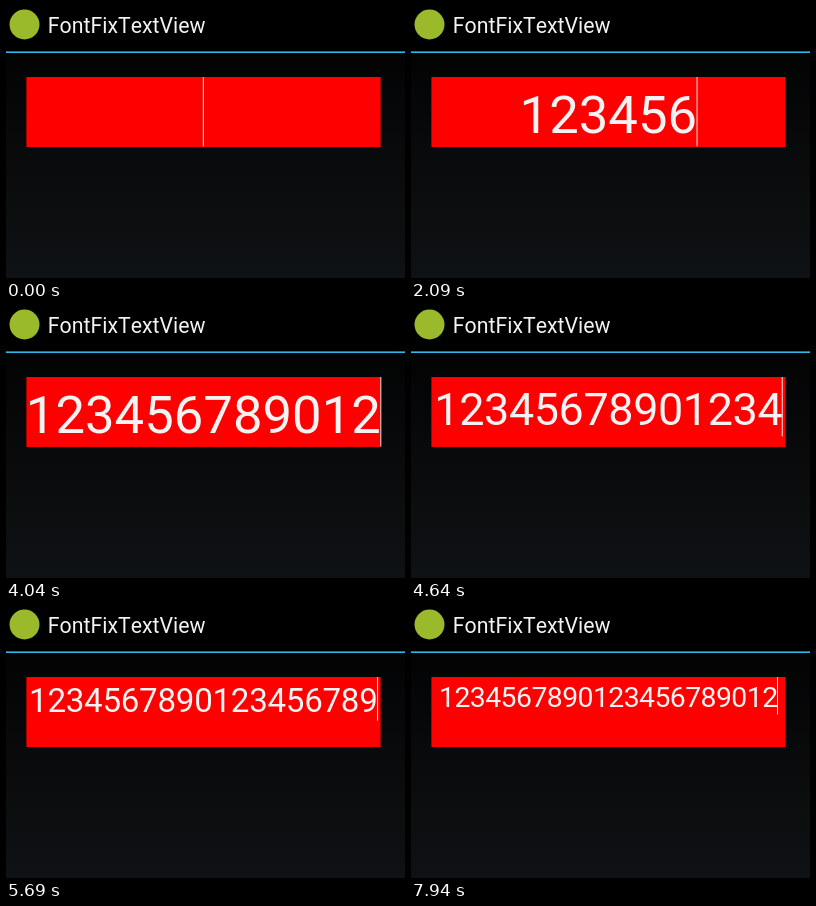
An HTML page with a canvas for the animation above (8000 ms loop, 399 by 272 pixels).

```html
<!DOCTYPE html>
<html lang="en">
<head>
<meta charset="utf-8">
<title>FontFixTextView</title>
<style>
  html, body { margin: 0; width: 399px; height: 272px; overflow: hidden; background: #000; }
  canvas { display: block; }
</style>
</head>
<body>
<canvas id="stage" width="399" height="272"></canvas>
<script>
const ctx = document.getElementById('stage').getContext('2d');
const W = 399, H = 272, LOOP = 8000;
const SCALE = 355 / 600;               // device pixels to stage pixels
const MID = 197.3, TOP = 71;
const BEAT = 150, BLINK = 1000, CARET_ON = 450;
const FAMILY = 'Roboto, "Noto Sans", sans-serif';

// Bursts of typing; a key falls every `pace` beats, rounded up to a whole beat
const BURSTS = [
  { at: 740, from: 1, to: 10, pace: 1.7, lag: 0 },
  { at: 3890, from: 11, to: 20, pace: 1.515, lag: 0.61 },
  { at: 6890, from: 19, to: 20, pace: 1, lag: 0 },
  { at: 7790, from: 21, to: 22, pace: 1, lag: 0 }
];

function typedAt(t) {
  let count = 0, lastKey = 0;
  for (const { at, from, to, pace, lag } of BURSTS) {
    for (let n = from; n <= to; n++) {
      const key = at + BEAT * Math.ceil(pace * (n - from) - lag);
      if (key <= t) [count, lastKey] = [n, key];
    }
  }
  return { count, caret: (t - lastKey) % BLINK < CARET_ON };
}

function rect(x, y, w, h, fill) {
  ctx.fillStyle = fill;
  ctx.fillRect(x, y, w, h);
}

function text(str, x, y, size) {
  ctx.font = size + 'px ' + FAMILY;
  ctx.fillStyle = '#f3f3f3';
  ctx.fillText(str, x, y);
}

function drawScreen() {
  const bg = ctx.createLinearGradient(0, 0, 0, H);
  bg.addColorStop(0, '#000');
  bg.addColorStop(1, '#0f1214');
  rect(0, 0, W, H, bg);
  rect(0, 0, W, 45, '#000');
  rect(0, 45.4, W, 1.6, '#33b5e5');

  ctx.fillStyle = '#9aba2c';
  ctx.beginPath();
  ctx.arc(18.5, 18.5, 15, 0, Math.PI * 2);
  ctx.fill();

  text('FontFixTextView', 41.8, 27.4, 21.3);
}

function drawField({ count, caret }) {
  // The text shrinks to fit once it passes twelve digits
  const size = Math.floor(1068 / Math.max(12, count));
  const step = Math.floor(size * 0.562) * SCALE;
  const px = size * SCALE, half = count * step / 2;

  rect(20.4, TOP, 354.2, 70, '#f00');
  for (let i = 0; i < count; i++) {
    text((i + 1) % 10, MID - half + i * step, TOP + px * 1.0566, px);
  }
  if (caret) rect(MID + half - 0.5, TOP, 1, px * 1.32, 'rgba(255,255,255,0.9)');
}

function frame(now) {
  drawScreen();
  drawField(typedAt(Math.max(0, now - start) % LOOP));
  requestAnimationFrame(frame);
}

ctx.fontKerning = 'none';
const start = performance.now();
frame(start);
</script>
</body>
</html>
```
